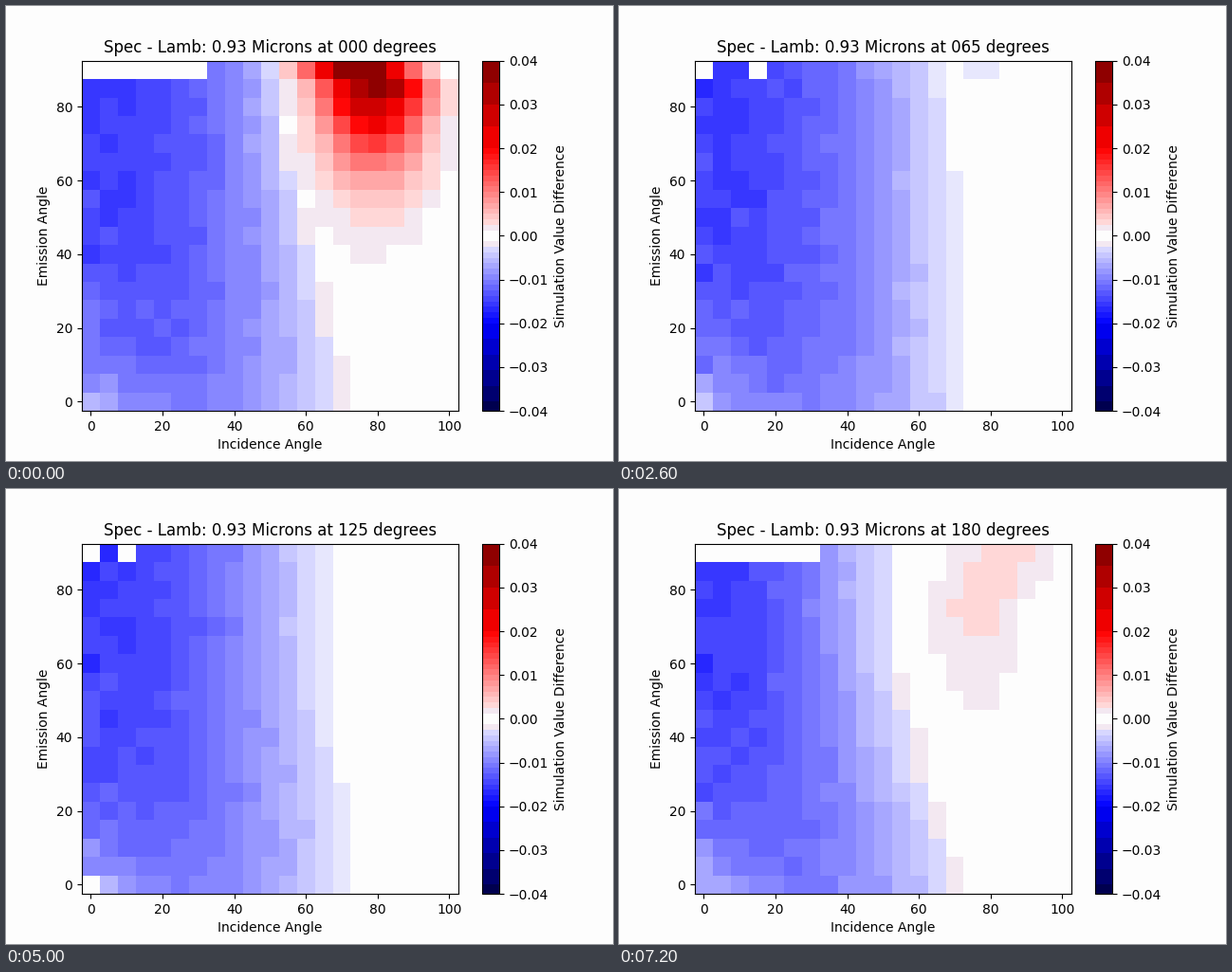
These frames come from a looping animation (640 by 480 pixels, 7.4 s). A matplotlib script:

```python
import matplotlib.pyplot as plt
import numpy as np
from matplotlib.animation import FuncAnimation
from matplotlib.cm import ScalarMappable
from matplotlib.colors import ListedColormap, Normalize

STEP = 0.00125  # value covered by one light colour band
PAPER = "#fdfdfd"
INC = np.arange(0, 101, 5)
EMI = np.arange(0, 91, 5)
I, E = np.meshgrid(INC, EMI)


def banded_map(faint):
    """Seismic colours reduced to flat bands; faint colours the palest one."""
    colors = []
    for n in range(256):
        dist = abs(n - 127.5)
        band = int(dist // 4)
        if band == 0:
            rgb = (253, 253, 253)
        elif band == 1:
            rgb = faint
        elif band < 16:
            pale = 247 - 16 * band
            rgb = (255, pale, pale) if n > 127 else (pale, pale, 255)
        else:
            drop = (dist - 64) / 64 * (127 if n > 127 else 179)
            dark = 239 - 32 * int(drop // 32)
            rgb = (dark, 0, 0) if n > 127 else (0, 0, dark)
        colors.append(np.array(rgb) / 255)
    return ListedColormap(colors)


def blue_depth(az):
    """Cosine fall-off whose cutoff moves in near the principal plane."""
    c = np.cos(np.radians(az))
    pull = c ** 2 * np.minimum(E, 75 + 12 * c) / 85
    cutoff = 77 - 24 * pull
    fall = np.cos(np.pi / 2 * np.clip(I / cutoff, 0, 1))
    fall = np.clip(fall, 0, 1) ** (1 - pull * (0.1 + 0.4 * c))
    dent = 0.62 * np.exp(-E / 22 - I / 28)
    return 12.5 * fall * (1 - dent)


def lobe(center, width, reach, power):
    return np.exp(-((90 - E) / reach) ** power - ((I - center) / width) ** 2)


def red_height(az):
    front = 36 * np.exp(-(az / 31) ** 1.66)
    rear = 2.9 * np.exp(-((180 - az) / 45) ** 2)
    rear_center = 76 + 8 * np.clip((E - 75) / 15, 0, 1)
    return (front * lobe(79 - 4 * (E > 85), 13 + (90 - E) / 12, 19, 1.3)
            + rear * lobe(rear_center, 14.5, 41, 2))


def field(az):
    rng = np.random.default_rng(az)
    blue = blue_depth(az)
    noise = rng.normal(size=I.shape) * (0.2 + 0.6 * np.exp(-I / 8))
    bands = red_height(az) - blue - noise * np.clip(blue / 4, 0, 1)

    # Cells without data: the first corners, a stray one, or half the top row.
    bands[-1, [0, rng.integers(1, 4)]] = 0
    if az % 180 == 0:
        bands[-1, :7] = 0
    elif az > 80:
        bands[0, 0] = 0
    return bands * STEP


mauve = banded_map((243, 232, 241))
bluish = banded_map((231, 231, 253))
norm = Normalize(-0.04, 0.04)


def colored(az):
    cmap = bluish if 60 <= az <= 140 else mauve
    return cmap(norm(field(az)))


fig, ax = plt.subplots(figsize=(6.4, 4.8), dpi=100, facecolor=PAPER)
mesh = ax.pcolormesh(INC, EMI, colored(0), shading="nearest")
ax.set_xlabel("Incidence Angle")
ax.set_ylabel("Emission Angle")
title = ax.set_title("")
fig.colorbar(ScalarMappable(norm, mauve), ax=ax,
             label="Simulation Value Difference")


def update(frame):
    az = 5 * frame
    mesh.set_array(colored(az))
    title.set_text(f"Spec - Lamb: 0.93 Microns at {az:03d} degrees")
    return mesh, title


anim = FuncAnimation(fig, update, frames=37, interval=200, repeat=True,
                     repeat_delay=0, blit=False)
plt.show()
```
